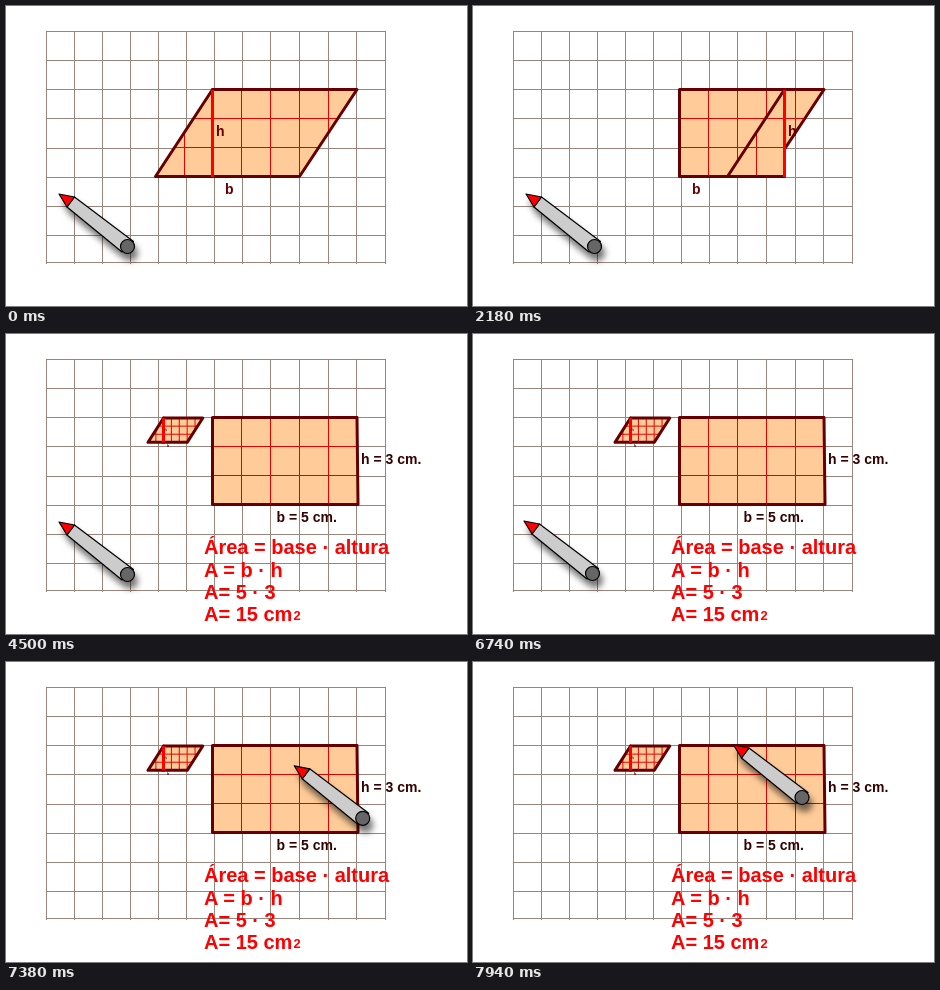
An HTML page for the animation above (8000 ms loop, 461 by 300 pixels).

```html
<!DOCTYPE html>
<html lang="es">
<head>
<meta charset="utf-8">
<style>
  html, body { margin: 0; width: 100%; height: 100%; overflow: hidden; background: #fff; }
  svg { display: block; }
  text { font: bold 14px "Liberation Sans", Arial, sans-serif; fill: #300; }
  .formula text { font-size: 20px; fill: red; }
  .formula .sup { font-size: 13px; }
  .fill { fill: #fc9; }
  .edge, .grid, .cells, .height { fill: none; vector-effect: non-scaling-stroke; }
  .edge { stroke: #600; stroke-width: 3; stroke-linejoin: round; stroke-linecap: round; }
  .cells { stroke: #e60000; }
  .height { stroke: red; stroke-width: 3; }
  .grid { stroke: #9a857c; shape-rendering: crispEdges; }
  #pen { stroke: #000; stroke-width: 1.2; stroke-linejoin: round; filter: drop-shadow(3px 7px 3px #0008); }
</style>
</head>
<body>
<svg width="461" height="300" viewBox="0 0 461 300">
  <defs>
    <g id="trapezoid">
      <path class="fill" d="M206.5 83.5H351L293.5 170.5H206.5Z"/>
      <path class="cells" d="M206.5 112.5H332M206.5 141.5H312.5M235.5 84V170M264.5 84V170M293.5 84V170M322.5 84V126.5"/>
      <path class="edge" d="M206.5 83.5H351L293.5 170.5H206.5Z"/>
    </g>
    <g id="triangle">
      <path class="fill" d="M206.5 83.5V170.5H149.5Z"/>
      <path class="cells" d="M187.5 112.5H206.5M168.5 141.5H206.5M178.5 126.5V170"/>
      <path class="edge" d="M206.5 83.5L149.5 170.5H206.5"/>
      <path class="height" d="M206.5 84V171"/>
      <text x="210" y="130" style="fill:#600">h</text>
    </g>
    <text id="base" x="219" y="188" style="fill:#600">b</text>
  </defs>

  <path class="grid" id="paper"/>

  <g id="cutting">
    <use href="#trapezoid"/>
    <use href="#triangle" id="piece"/>
  </g>
  <g id="rectangle">
    <path class="fill" d="M206.5 83.5H351L352 170.5H206.5Z"/>
    <path class="cells" d="M206.5 112.5H351M206.5 141.5H351M235.5 84V170M264.5 84V170M293.5 84V170M322.5 84V170"/>
    <path class="edge" d="M206.5 83.5H351L352 170.5H206.5Z"/>
  </g>
  <use href="#base" id="baseLabel"/>

  <g id="result">
    <g transform="translate(142 84) scale(.272 .28) translate(-149.5 -83.5)">
      <use href="#trapezoid"/>
      <use href="#triangle"/>
      <use href="#base"/>
    </g>
    <text x="355" y="130">h = 3 cm.</text>
    <text x="270.5" y="188">b = 5 cm.</text>
    <g class="formula">
      <text x="198" y="220">Área = base · altura</text>
      <text x="198" y="243">A = b · h</text>
      <text x="198" y="265">A= 5 · 3</text>
      <text x="198" y="287">A= 15 cm</text>
      <text class="sup" x="287.5" y="286">2</text>
    </g>
  </g>

  <g id="pen">
    <path fill="#ccc" d="M68.5 191L127.5 235.5L116 246L61 201Z"/>
    <path fill="red" d="M53 188L68.5 191L61 201Z"/>
    <circle cx="121.5" cy="240.5" r="7" fill="#666"/>
  </g>
</svg>
<script>
const LOOP = 8000;
const SLIDE = [0, 14, 45, 72, 105, 131, 145];
const el = id => document.getElementById(id);
const show = (id, on) => el(id).style.display = on ? '' : 'none';

const columns = [40, 68, 96, 124, 152, 180, 208, 236, 264, 293, 322, 350, 379];
const rows = [25, 54, 83, 112, 142, 171, 200, 229, 256];
el('paper').setAttribute('d',
  columns.map(x => `M${x + .5} 25V258`).join('') + rows.map(y => `M40 ${y + .5}H380`).join(''));

// The pen flies to the upper right corner, then follows the top edge to the left.
function penOffset(t) {
  const step = Math.floor((t - 6740) / 80);
  if (step < 0) return [0, 0];
  const out = Math.min(step, 10), back = Math.max(step - 10, 0);
  return [-2 + 29.65 * out - 17.4 * back, -1 - 10.4 * out];
}

function draw(t) {
  const slide = Math.min(6, Math.max(0, 1 + Math.floor((t - 500) / 560)));
  el('piece').setAttribute('x', SLIDE[slide]);
  show('cutting', t < 3860);
  show('rectangle', t >= 3860);
  show('baseLabel', t < 4500);
  show('result', t >= 4500);
  el('pen').setAttribute('transform', `translate(${penOffset(t)})`);
}

const start = performance.now();
function tick() {
  draw((performance.now() - start) % LOOP);
  requestAnimationFrame(tick);
}
tick();
</script>
</body>
</html>
```
